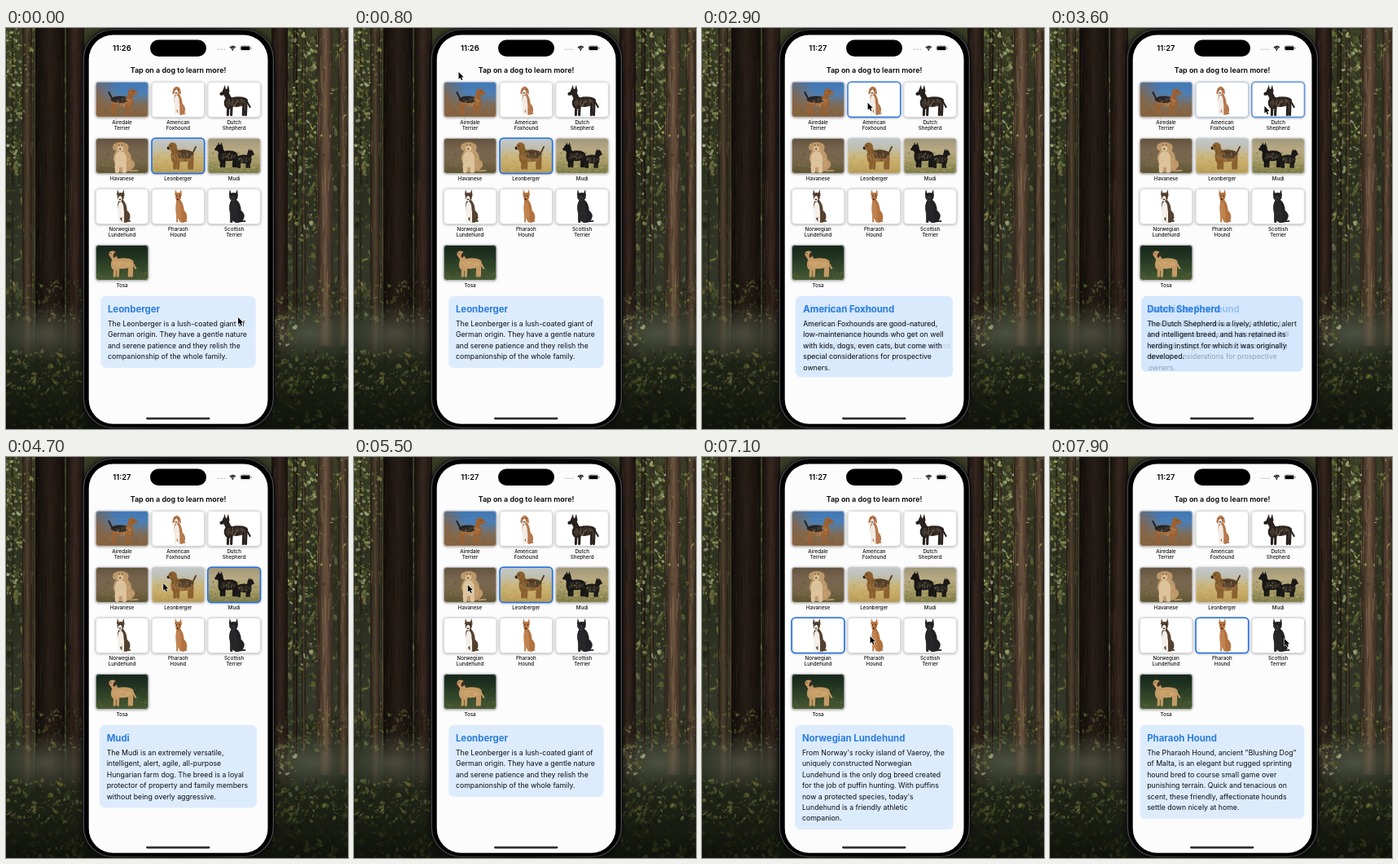
These frames come from a looping animation (420x492 px, 8 s). An HTML page with a canvas:

```html
<!DOCTYPE html>
<html lang="en">
<head>
<meta charset="utf-8">
<title>Dog breeds</title>
<style>
html, body { margin: 0; width: 100%; height: 100%; overflow: hidden; background: #1d2014; }
canvas { display: block; width: 420px; height: 492px; }
</style>
</head>
<body>
<canvas id="stage"></canvas>
<script>
const W = 420, H = 492, LOOP = 8000, FADE = 330;
const FONT = 'Inter, "Open Sans", sans-serif';
const ratio = window.devicePixelRatio || 1;

function setup(canvas) {
  canvas.width = W * ratio;
  canvas.height = H * ratio;
  const c = canvas.getContext('2d');
  c.scale(ratio, ratio);
  return c;
}
const stage = setup(document.getElementById('stage'));
const scenery = document.createElement('canvas');
let g = setup(scenery);

let seed = 7;
function rnd(lo = 0, hi = 1) {
  seed = (seed * 16807) % 2147483647;
  return lo + (hi - lo) * (seed / 2147483647);
}
const clamp = v => Math.max(0, Math.min(1, v));
const ease = v => { v = clamp(v); return v * v * (3 - 2 * v); };
const mix = (a, b, p) => a + (b - a) * p;

function rounded(x, y, w, h, r) {
  g.beginPath();
  g.roundRect(x, y, w, h, r);
}
function pill(x, y, w, h, r, fill) {
  rounded(x, y, w, h, r);
  g.fillStyle = fill;
  g.fill();
}
function outline(x, y, w, h, r, color, width) {
  rounded(x, y, w, h, r);
  g.strokeStyle = color;
  g.lineWidth = width;
  g.stroke();
}
function fade(stops, x0, y0, x1, y1) {
  const grad = g.createLinearGradient(x0, y0, x1, y1);
  stops.forEach((s, i) => grad.addColorStop(i / (stops.length - 1), s));
  return grad;
}
function type(str, x, y, size, weight, color, align = 'left') {
  g.font = `${weight} ${size}px ${FONT}`;
  g.textAlign = align;
  g.fillStyle = color;
  g.fillText(str, x, y);
}
function oval(x, y, rx, ry, fill, turn = 0) {
  g.beginPath();
  g.ellipse(x, y, rx, ry, turn, 0, 7);
  g.fillStyle = fill;
  g.fill();
}
function limb(x0, y0, x1, y1, width, color) {
  g.beginPath();
  g.moveTo(x0, y0);
  g.lineTo(x1, y1);
  g.lineCap = 'round';
  g.lineWidth = width;
  g.strokeStyle = color;
  g.stroke();
}
function shape(color, ...points) {
  g.beginPath();
  points.forEach(([x, y]) => g.lineTo(x, y));
  g.fillStyle = color;
  g.fill();
}

/* ---------- forest ---------- */
function leaves(count, x0, x1, y0, y1, light, size) {
  for (let i = 0; i < count; i++) {
    const l = light * rnd(0.3, 1.5);
    oval(rnd(x0, x1), rnd(y0, y1), rnd(0.5, size), rnd(0.4, size * 0.6),
      `hsla(${rnd(48, 84)},${rnd(22, 42)}%,${l}%,${rnd(0.25, 0.75)})`, rnd(0, 3));
  }
}
function trunk(x, w, hue, light, foot) {
  const tone = l => `hsl(${hue},26%,${l}%)`;
  g.fillStyle = fade([tone(light * 0.4), tone(light), tone(light * 0.45)], x, 0, x + w, 0);
  g.fillRect(x, 0, w, foot);
  for (let i = 0; i < w * 6; i++) {
    const u = x + rnd(0, w), y = rnd(0, foot - 40);
    limb(u, y, u + rnd(-1, 1), y + rnd(8, 40), rnd(0.3, 1.2),
      `hsla(${hue},25%,${light * rnd(0.2, 1.7)}%,.4)`);
  }
}
function haze(x, y, rx, ry, rgb, a) {
  g.save();
  g.translate(x, y);
  g.scale(rx, ry);
  const grad = g.createRadialGradient(0, 0, 0, 0, 0, 1);
  grad.addColorStop(0, `rgba(${rgb},${a})`);
  grad.addColorStop(1, `rgba(${rgb},0)`);
  g.fillStyle = grad;
  g.fillRect(-1, -1, 2, 2);
  g.restore();
}
function forest() {
  g.fillStyle = fade(['#3a3d26', '#2f3320', '#2b2f20', '#34372a', '#20261a', '#14170e'], 0, 0, 0, H);
  g.fillRect(0, 0, W, H);
  for (const x of [0, 335]) {
    leaves(650, x, x + 90, 0, 350, 27, 5);
    for (let i = 0; i < 7; i++) trunk(x + rnd(0, 85), rnd(2, 5), 40, rnd(12, 27), 365);
  }
  leaves(140, 0, 20, 0, 180, 52, 3.5);
  leaves(260, 346, 384, 0, 260, 50, 3.5);
  trunk(20, 12, 34, 25, 400);
  trunk(36, 36, 25, 12, 430);
  trunk(74, 22, 20, 17, 460);
  trunk(326, 20, 18, 17, 460);
  trunk(383, 18, 28, 34, 390);
  trunk(408, 12, 30, 29, 390);
  leaves(90, 0, 36, 0, 110, 40, 3);
  leaves(130, 346, 420, 0, 170, 40, 3);
  g.fillStyle = fade(['rgba(26,31,18,0)', 'rgba(31,36,23,.9)', 'rgba(15,18,11,.95)'], 0, 340, 0, H);
  g.fillRect(0, 340, W, 152);
  for (const [x, w] of [[0, 95], [328, 92]]) {
    leaves(170, x, x + w, 310, 360, 27, 3.5);
    haze(x + w / 2, 375, 80, 38, '135,138,116', 0.42);
    leaves(220, x, x + w, 395, 450, 25, 4);
    leaves(120, x, x + w, 440, 492, 13, 5);
  }
  leaves(60, 330, 356, 352, 390, 52, 3.5);
}

/* ---------- phone ---------- */
function phone() {
  g.save();
  g.shadowColor = 'rgba(0,0,0,.65)';
  g.shadowBlur = 10 * ratio;
  pill(93.5, 0.5, 236.5, 491.5, 38, '#0b0b0c');
  g.restore();
  outline(95.2, 1.8, 233.2, 488.8, 36.5, fade(['#4a4b4e', '#17181a', '#4a4b4e'], 94, 0, 330, 0), 1.2);
  pill(96.8, 3.2, 230, 486, 35, '#000');
  pill(101.7, 8.5, 219.8, 477.3, 30, '#fcfcfd');
  pill(177, 14.5, 69, 20.4, 10.2, '#000');
  pill(172, 477.7, 78.5, 2.8, 1.4, '#303033');

  for (let i = 0; i < 4; i++) oval(260.2 + i * 2.8, 26.2, 0.75, 0.75, '#aaa');
  g.lineCap = 'butt';
  g.strokeStyle = '#000';
  g.lineWidth = 1.25;
  for (const r of [2.8, 4.7]) {
    g.beginPath();
    g.arc(278.3, 27.2, r, -Math.PI * 0.76, -Math.PI * 0.24);
    g.stroke();
  }
  oval(278.3, 26.7, 1, 1, '#000');
  outline(287.7, 21.6, 12.6, 6.2, 2, '#999', 0.5);
  pill(288.5, 22.4, 11, 4.6, 1.3, '#000');
  pill(301, 23.7, 0.9, 2, 0.4, '#888');
  type('Tap on a dog to learn more!', 211.5, 55, 8.95, 600, '#000', 'center');
}

/* ---------- dog cards, drawn in a 65 x 44 box ---------- */
const CW = 65.5, CH = 44;

function backdrop(stops, specks) {
  g.fillStyle = fade(stops, 0, 0, 0, CH);
  g.fillRect(0, 0, CW, CH);
  for (let i = 0; specks && i < 160; i++) {
    g.globalAlpha = rnd(0.1, 0.5);
    oval(rnd(0, CW), rnd(18, CH), rnd(0.4, 1.8), rnd(0.3, 1), specks[i % specks.length]);
  }
  g.globalAlpha = 1;
}
function fur(color, x, y, rx, ry) {
  for (let i = 0; i < 60; i++) {
    const a = rnd(0, 6.3), r = Math.sqrt(rnd());
    const u = x + Math.cos(a) * r * rx, v = y + Math.sin(a) * r * ry;
    g.globalAlpha = rnd(0.1, 0.4);
    limb(u, v, u + rnd(-1, 1), v + rnd(1, 3), 0.6, color);
  }
  g.globalAlpha = 1;
}
// Profile, head to the left; "size" 1 spans about 36 x 36
function standing({ x = 33, y = 24, size = 1, flip = 1, coat, back = coat, face = coat, bulk = 1, prick }) {
  g.save();
  g.translate(x, y);
  g.scale(size * flip, size);
  for (const u of [-9, -5, 9, 12]) limb(u, 2, u - 0.5, 15, 3 * bulk, coat);
  limb(12, -2, 16.5, back === coat ? 6 : -11, 2, back);
  oval(0, 0, 13.5, 5.8 * bulk, coat);
  oval(-8, 1, 6, 7.2 * bulk, coat);
  oval(3, -2, 11, 4.2 * bulk, back);
  limb(-8, -3, -11.5, -10, 6.5 * bulk, coat);
  limb(-12, -11, -17, -9.6, 4, face);
  oval(-12, -11.5, 4 * bulk, 3.7 * bulk, coat);
  if (prick) for (const u of [-13.5, -9.5]) shape(coat, [u - 2, -13], [u + 0.5, -20], [u + 2.2, -12]);
  else oval(-9.2, -10.5, 1.8, 3.4, back === coat ? face : coat, 0.3);
  oval(-14, -12.2, 0.6, 0.6, '#15100d');
  fur('#f0cf9b', 0, 0, 12, 5);
  g.restore();
}
// Front view with the haunch to the right
function sitting({ x = 32, size = 1, coat, chest = coat, face = coat, wide = 1, prick }) {
  g.save();
  g.translate(x, 23);
  g.scale(size, size);
  oval(4, 11, 7 * wide, 8, coat, -0.2);
  oval(1, 2, 6 * wide, 12, coat, -0.15);
  oval(-1, 3, 4 * wide, 10, chest);
  for (const u of [-3, 2]) limb(u * wide, 5, u * wide, 17.5, 2.8 * wide, chest);
  limb(6 * wide, 17.5, 11 * wide, 17, 1.8, coat);
  oval(-1, -13, 4.4 * wide, 5, coat);
  oval(-1.7, -10.5, 2.4 * wide, 3.4, face);
  for (const s of [-1, 1]) {
    const u = -1 + s * 3 * wide;
    if (prick) shape(coat, [u - 2, -15], [u + s, -22], [u + 2, -14]);
    else oval(u + s * 1.2, -12, 1.7 * wide, 4.2, coat, -s * 0.2);
    oval(-1 + s * 1.9, -14, 0.6, 0.6, '#15100d');
  }
  oval(-1.8, -9.5, 1.1, 0.8, '#1b1512');
  g.restore();
}

const dogs = [
  ['Airedale|Terrier', () => {
    backdrop(['#3f77b5', '#4d7fb4', '#7f6c55', '#84603c'], ['#6d5033', '#a57a4b']);
    haze(0, 18, 28, 32, '140,95,55', 0.85);
    standing({ flip: -1, coat: '#9a6135', back: '#262322' });
  }],
  ['American|Foxhound', () => {
    sitting({ size: 0.95, coat: '#b5784c', chest: '#f1ebe5', face: '#f5f0ea', wide: 0.85 });
  }],
  ['Dutch|Shepherd', () => {
    standing({ y: 25, x: 35, size: 1.05, coat: '#29221e', face: '#1c1816', prick: true });
  }],
  ['Havanese', () => {
    backdrop(['#62523d', '#786550', '#77664a', '#5b5230'], ['#4f4f27', '#978554']);
    sitting({ coat: '#bd9768', chest: '#dbc29b', face: '#d9bb90', wide: 1.8 });
    fur('#f3e0bd', 33, 25, 12, 16);
  }],
  ['Leonberger', () => {
    backdrop(['#c3c9cb', '#bfc0b4', '#cbb77f', '#c6aa65', '#b39755'], ['#e0c783', '#a38a4d']);
    standing({ x: 38, y: 22, coat: '#8a602f', back: '#56402a', face: '#2a1e17', bulk: 1.3 });
    fur('#33241a', 36, 18, 12, 7);
  }],
  ['Mudi', () => {
    backdrop(['#9d9679', '#b9a983', '#a59a66', '#7b7945'], ['#cbba83', '#5b612d']);
    standing({ x: 25, y: 22, size: 0.85, coat: '#171615', bulk: 1.3, prick: true });
    standing({ x: 45, y: 26, size: 0.65, flip: -1, coat: '#1b1a18', bulk: 1.4, prick: true });
  }],
  ['Norwegian|Lundehund', () => {
    sitting({ coat: '#55402f', chest: '#f4efe8', face: '#f6f1ea', wide: 0.95, prick: true });
  }],
  ['Pharaoh|Hound', () => {
    sitting({ x: 34, coat: '#b3713f', chest: '#c08350', wide: 0.8, prick: true });
  }],
  ['Scottish|Terrier', () => {
    sitting({ x: 33, coat: '#222225', chest: '#28282b', face: '#343437', wide: 1.2, prick: true });
  }],
  ['Tosa', () => {
    backdrop(['#16261a', '#213421', '#33472a', '#4d5c35'], ['#66753c', '#2b3d20']);
    standing({ y: 23, coat: '#c49a65', face: '#3b2a22', bulk: 1.1 });
  }]
];
const rows = [65.8, 134.9, 196.9, 266];
const corner = i => [109.8 + (i % 3) * 68.8, rows[Math.floor(i / 3)]];

function cards() {
  dogs.forEach(([label, draw], i) => {
    const [x, y] = corner(i);
    g.save();
    g.shadowColor = 'rgba(0,0,0,.35)';
    g.shadowBlur = 3 * ratio;
    g.shadowOffsetY = 0.6 * ratio;
    pill(x, y, CW, CH, 4.5, '#fff');
    g.restore();
    g.save();
    rounded(x, y, CW, CH, 4.5);
    g.clip();
    g.translate(x, y);
    draw();
    g.restore();
    outline(x + 0.5, y + 0.5, CW - 1, CH - 1, 4.2, 'rgba(205,207,210,.85)', 1);
    label.split('|').forEach((part, k) =>
      type(part, x + CW / 2, y + 52.2 + k * 7.2, 6.2, 500, '#111', 'center'));
  });
}

/* ---------- details ---------- */
// Taps in order: time, card, where the pointer rests on the card, text
const leonberger = 'The Leonberger is a lush-coated giant of|German origin. They have a gentle nature|and serene patience and they relish the|companionship of the whole family.';
const taps = [
  [-1000, 4, 0, 0, leonberger],
  [1500, 0, 58, 20, "The Airedale stands among the world's|most versatile dog breeds and has|distinguished himself as hunter, athlete, and|companion."],
  [2650, 1, 25, 26, 'American Foxhounds are good-natured,|low-maintenance hounds who get on well|with kids, dogs, even cats, but come with|special considerations for prospective|owners.'],
  [3400, 2, 16, 30, 'The Dutch Shepherd is a lively, athletic, alert|and intelligent breed, and has retained its|herding instinct for which it was originally|developed.'],
  [4150, 5, 25, 24, 'The Mudi is an extremely versatile,|intelligent, alert, agile, all-purpose|Hungarian farm dog. The breed is a loyal|protector of property and family members|without being overly aggressive.'],
  [4850, 4, 11, 20, leonberger],
  [5600, 3, 30, 22, 'Havanese, the only dog breed native to|Cuba, are vivacious and sociable|companions and are especially popular with|American city dwellers.'],
  [6400, 6, 25, 20, "From Norway's rocky island of Vaeroy, the|uniquely constructed Norwegian|Lundehund is the only dog breed created|for the job of puffin hunting. With puffins|now a protected species, today's|Lundehund is a friendly athletic|companion."],
  [7150, 7, 28, 23, 'The Pharaoh Hound, ancient "Blushing Dog"|of Malta, is an elegant but rugged sprinting|hound bred to course small game over|punishing terrain. Quick and tenacious on|scent, these friendly, affectionate hounds|settle down nicely at home.']
].map(([time, card, dx, dy, text]) => {
  const lines = text.split('|');
  g.font = `400 8.75px ${FONT}`;
  const widest = Math.max(...lines.map(s => g.measureText(s).width));
  const [x, y] = corner(card);
  return {
    time, card, lines, x: x + dx, y: y + dy,
    title: dogs[card][0].replace('|', ' '),
    w: Math.min(202, widest + 19.6),
    h: 34.6 + 13.4 * lines.length
  };
});
const MID = 211.4, TOP = 328.8, PAD = 8.8;

function info(tap, alpha, w, h, left) {
  if (alpha <= 0) return;
  g.globalAlpha = alpha;
  pill(MID - w / 2, TOP, w, h, 6.5, 'rgba(0,122,255,.12)');
  type(tap.title, left, 348.6, 11.4, 700, '#2b7de0');
  tap.lines.forEach((s, i) => type(s, left, 366 + i * 13.4, 8.75, 400, '#0b0d10'));
  g.globalAlpha = 1;
}
function ring(tap, alpha) {
  const [x, y] = corner(tap.card);
  outline(x + 0.4, y + 0.4, CW - 0.8, CH - 0.8, 4.4, `rgba(30,112,225,${alpha})`, 1.6);
}
function details(t) {
  const i = taps.findLastIndex(tap => tap.time <= t);
  const now = taps[i], was = taps[Math.max(0, i - 1)];
  const p = ease((t - now.time) / FADE);
  const w = mix(was.w, now.w, p), h = mix(was.h, now.h, p);
  if (p < 1) ring(was, (1 - p) ** 2);
  ring(now, p);
  info(was, 1 - p, w, h, MID - w / 2 + PAD);
  info(now, Math.min(1, p * 1.5), w, h, MID - now.w / 2 + PAD);
}

/* ---------- pointer ---------- */
// It reaches each card shortly before the tap and rests there in between
const stops = [
  { at: 0, x: 285, y: 355 }, { at: 800, x: 128.5, y: 54 },
  ...taps.slice(1).map(tap => ({ at: tap.time - 100, x: tap.x, y: tap.y })),
  { at: 7900, x: 288, y: 223 }
];
function pointer(t) {
  const i = Math.max(0, stops.findLastIndex(s => s.at <= t));
  const a = stops[i], b = stops[i + 1] || a;
  const travel = Math.min(400, b.at - a.at) || 1;
  const p = ease((t - b.at + travel) / travel);
  g.save();
  g.translate(mix(a.x, b.x, p), mix(a.y, b.y, p));
  g.scale(0.92, 0.92);
  g.beginPath();
  [[0, 0], [0, 9.4], [2.1, 7.5], [3.7, 11], [5.3, 10.3], [3.8, 7], [6.6, 6.7]]
    .forEach(([x, y]) => g.lineTo(x, y));
  g.closePath();
  g.lineJoin = 'round';
  g.strokeStyle = '#fff';
  g.lineWidth = 1.2;
  g.stroke();
  g.fillStyle = '#000';
  g.fill();
  g.restore();
}

forest();
phone();
cards();
g = stage;

const start = performance.now();
function frame() {
  const t = Math.floor(((performance.now() - start) % LOOP) / 100) * 100;
  g.drawImage(scenery, 0, 0, W, H);
  type(t < 2800 ? '11:26' : '11:27', 142.3, 28.2, 9.3, 600, '#000', 'center');
  details(t);
  pointer(t);
  requestAnimationFrame(frame);
}
frame();
</script>
</body>
</html>
```
